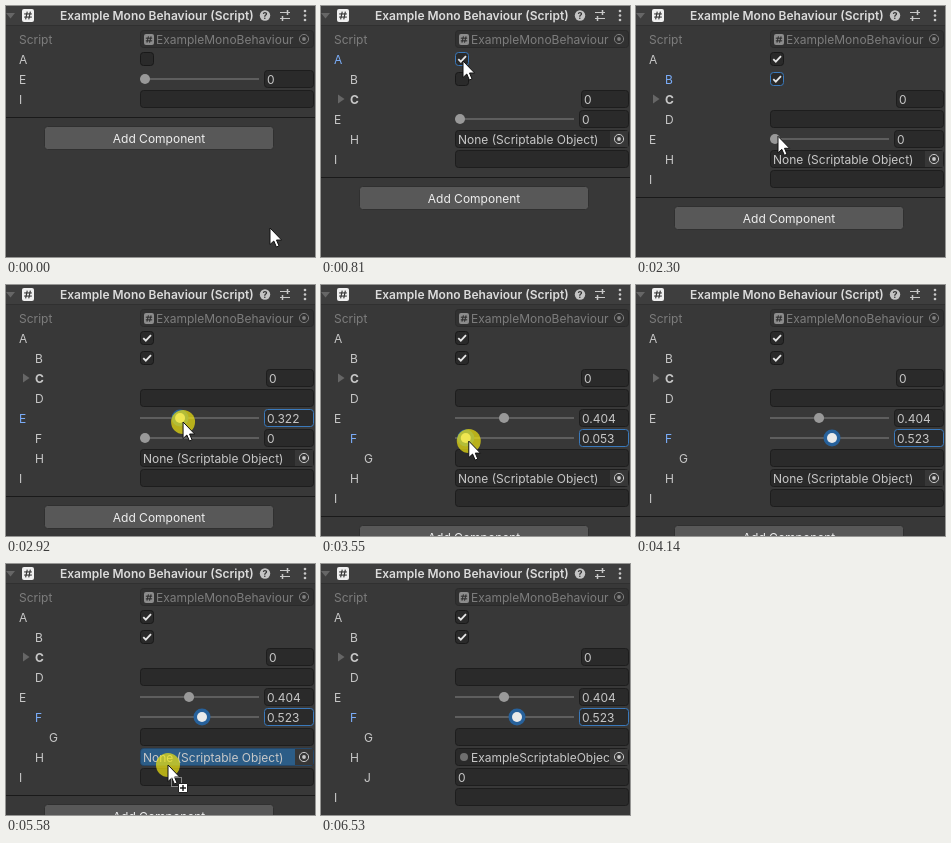
Animation, 309 px wide and 251 px high, one loop 7.14 s. Source, as an HTML page with a canvas:

```html
<!DOCTYPE html>
<html lang="en">
<head>
<meta charset="utf-8">
<title>Inspector with conditional fields</title>
<style>
  html, body { margin: 0; width: 100%; height: 100%; overflow: hidden; background: #383838; }
  canvas { display: block; width: 309px; height: 251px; }
</style>
</head>
<body>
<canvas id="stage"></canvas>
<script>
const W = 309, H = 251, LOOP = 7140;
const FONT = 'Inter, "Liberation Sans", sans-serif';
const TEXT = '#c8c8c8', DIM = '#7d7d7d', BLUE = '#7baefa', FOCUS = '#3a79bb';
const canvas = document.getElementById('stage');
const g = canvas.getContext('2d');
const scale = window.devicePixelRatio || 1;
canvas.width = W * scale;
canvas.height = H * scale;

// Slider geometry: the pointer holds the knob 3px right of its centre.
const knobX = value => 139 + 109 * value;
const gripX = value => knobX(value) + 3;
const gripValue = x => Math.max(0, Math.min(1, (x - gripX(0)) / 109));

const linear = k => k;
const smooth = k => k * k * (3 - 2 * k);
const easeOut = k => 1 - (1 - k) ** 2;

// Pointer path: time, x, y, easing towards this point.
const path = [
  [0, 264, 222], [30, 264, 222], [740, 142, 55, smooth],
  [810, 142, 55], [1520, 142, 82, smooth], [1830, 142, 82],
  [2420, gripX(0), 136, smooth], [2650, gripX(0), 136],
  [2920, gripX(.321), 137], [3150, gripX(.404), 137, easeOut],
  [3200, gripX(.404), 137], [3430, gripX(0), 156, smooth], [3480, gripX(0), 156],
  [3840, gripX(.523), 157, smooth], [3920, gripX(.523), 157],
  [4070, 162, 162, smooth], [4100, 36, 193], [4140, -40, 210],
  [5069, -40, 270], [5070, 152, 256], [5580, 162, 201, easeOut],
  [6140, 162, 201], [6530, 188, 256, smooth], [LOOP, 188, 290]
];
const presses = [[740, 810], [1730, 1830], [2650, 3170], [3480, 3870], [5070, 5810]];
const focusSpans = [
  ['A', 740, 1730], ['B', 1730, 2650], ['E', 2650, 3480],
  ['F', 3480, 4810], ['F', 5070, LOOP]
];
const within = (t, a, b) => t >= a && t < b;

function pointerAt(t) {
  const i = Math.max(1, path.findIndex(p => p[0] > t));
  const [t0, x0, y0] = path[i - 1], [t1, x1, y1, ease = linear] = path[i];
  const k = ease((t - t0) / (t1 - t0));
  return { x: x0 + (x1 - x0) * k, y: y0 + (y1 - y0) * k };
}

const dragValue = (t, from, to) =>
  t < from ? 0 : gripValue(pointerAt(Math.min(t, to)).x);

function stateAt(t) {
  const focus = focusSpans.find(([, a, b]) => within(t, a, b));
  return {
    pointer: pointerAt(t),
    pressed: presses.some(([a, b]) => within(t, a, b)),
    focus: focus && focus[0],
    a: t >= 810,
    b: t >= 1830,
    e: dragValue(t, 2650, 3150),
    f: dragValue(t, 3480, 3840),
    dragging: within(t, 5070, 5810),
    over: within(t, 5400, 5810),
    dropped: t >= 5810
  };
}

function text(str, x, cy, color = TEXT, weight = 400, align = 'left') {
  g.font = `${weight} 12px ${FONT}`;
  g.textAlign = align;
  g.fillStyle = color;
  g.fillText(str, x, cy + 4.5);
}

function clipped(x, y, w, h, draw) {
  g.save();
  g.beginPath();
  g.rect(x, y, w, h);
  g.clip();
  draw();
  g.restore();
}

function disc(x, y, r, color) {
  g.fillStyle = color;
  g.beginPath();
  g.arc(x, y, r, 0, 7);
  g.fill();
}

function box(x, y, w, h, fill, border, r = 3) {
  g.beginPath();
  g.roundRect(x + .5, y + .5, w - 1, h - 1, r);
  g.fillStyle = fill;
  g.fill();
  g.strokeStyle = border;
  g.lineWidth = 1;
  g.stroke();
}

function poly(points, fill) {
  g.beginPath();
  points.forEach(([x, y]) => g.lineTo(x, y));
  g.closePath();
  g.fillStyle = fill;
  g.fill();
}

function line(x0, y0, x1, y1, color, width = 1) {
  g.strokeStyle = color;
  g.lineWidth = width;
  g.beginPath();
  g.moveTo(x0, y0);
  g.lineTo(x1, y1);
  g.stroke();
}

const hovers = (s, x, y, w, h) => !s.dragging &&
  s.pointer.x >= x && s.pointer.x < x + w && s.pointer.y >= y && s.pointer.y < y + h;

function field(s, x, cy, str = '', focused = false) {
  const w = 308 - x, y = cy - 9;
  box(x, y, w, 18, '#2a2a2a', focused ? FOCUS : hovers(s, x, y, w, 18) ? '#656565' : '#1d1d1d');
  text(str, x + 3, cy);
}

function checkbox(s, cy, on, focused) {
  const y = cy - 7;
  box(134, y, 14, 14, '#2a2a2a', focused ? FOCUS : hovers(s, 134, y, 14, 14) ? '#656565' : '#191919');
  if (!on) return;
  g.strokeStyle = '#e6e6e6';
  g.lineWidth = 1.8;
  g.beginPath();
  g.moveTo(137.3, cy + .2);
  g.lineTo(139.8, cy + 2.7);
  g.lineTo(145, cy - 2.8);
  g.stroke();
}

function slider(s, cy, value, focused) {
  const x = knobX(value);
  g.fillStyle = '#5e5e5e';
  g.fillRect(134, cy - 1, 119, 2);
  if (focused) disc(x, cy, 8.5, '#27619b');
  disc(x, cy, 5, focused ? '#eaeaea' : '#999');
  field(s, 258, cy, String(+value.toFixed(3)), focused);
}

function picker(cy, color) {
  g.strokeStyle = color;
  g.lineWidth = 1;
  g.beginPath();
  g.arc(298, cy, 4.6, 0, 7);
  g.stroke();
  disc(298, cy, 1.9, color);
}

function objectField(s, cy) {
  field(s, 134, cy);
  if (s.over) box(134, cy - 9, 174, 18, '#2c5d87', '#25486a');
  clipped(135, cy - 8, 154, 16, () => {
    if (s.dropped) disc(143, cy, 4, '#707070');
    text(s.dropped ? 'ExampleScriptableObject' : 'None (Scriptable Object)', s.dropped ? 150 : 137, cy);
  });
  g.fillStyle = '#373737';
  g.fillRect(289, cy - 8, 18, 16);
  picker(cy, TEXT);
}

function scriptIcon(x, y, size, fill, ink) {
  g.beginPath();
  g.roundRect(x, y, size, size + 1, 2);
  g.fillStyle = fill;
  g.fill();
  const m = size / 2, r = size * .32, d = size * .13;
  for (const k of [-d, d]) {
    line(x + m + k + .8, y + m - r + .5, x + m + k - .8, y + m + r + .5, ink, 1.1);
    line(x + m - r, y + m + k + .5, x + m + r, y + m + k + .5, ink, 1.1);
  }
}

function header() {
  g.fillStyle = '#3e3e3e';
  g.fillRect(0, 0, W, 19);
  g.fillStyle = '#303030';
  g.fillRect(0, 19, W, 1);
  poly([[0, 7], [9, 7], [4.5, 12.5]], '#666');
  scriptIcon(16, 3, 12, '#efefef', '#333');
  clipped(54, 0, 193, 19, () => text('Example Mono Behaviour (Script)', 54, 9.5, '#dcdcdc', 600));
  disc(259, 9.5, 5.2, '#c4c4c4');
  g.font = `700 9px ${FONT}`;
  g.textAlign = 'center';
  g.fillStyle = '#333';
  g.fillText('?', 259, 13);
  line(274, 6.5, 284, 6.5, TEXT);
  line(274, 12.5, 284, 12.5, TEXT);
  line(281.5, 4, 281.5, 9, TEXT, 1.5);
  line(276.5, 10, 276.5, 15, TEXT, 1.5);
  for (const y of [5, 9.5, 14]) disc(299, y, 1.3, TEXT);
}

function scriptRow() {
  text('Script', 13, 33, DIM);
  box(134, 24, 174, 18, '#313131', '#2a2a2a');
  scriptIcon(138, 28, 10, '#8c8c8c', '#303030');
  text('ExampleMonoBehaviour', 150, 33, DIM);
  picker(33, DIM);
}

// Rows: name, indent, visible, control.
const rowsFor = s => [
  ['A', 13, true, cy => checkbox(s, cy, s.a, s.focus === 'A')],
  ['B', 29, s.a, cy => checkbox(s, cy, s.b, s.focus === 'B')],
  ['C', 29, s.a, cy => {
    poly([[17, cy - 4.5], [23.5, cy], [17, cy + 4.5]], '#666');
    field(s, 260, cy, '0');
  }],
  ['D', 29, s.b, cy => field(s, 134, cy)],
  ['E', 13, true, cy => slider(s, cy, s.e, s.focus === 'E')],
  ['F', 29, s.e > 0, cy => slider(s, cy, s.f, s.focus === 'F')],
  ['G', 43, s.f > 0, cy => field(s, 134, cy)],
  ['H', 29, s.a, cy => objectField(s, cy)],
  ['J', 43, s.dropped, cy => field(s, 134, cy, '0')],
  ['I', 13, true, cy => field(s, 134, cy)]
].filter(row => row[2]);

function arrow({ x, y }) {
  const outline = [[0, 0], [0, 16.5], [3.8, 13], [6.4, 19], [9, 17.9], [6.5, 12], [11.6, 12]];
  poly(outline.map(([dx, dy]) => [x + dx, y + dy]), '#fff');
  g.strokeStyle = '#111';
  g.lineWidth = 1;
  g.stroke();
}

function dragBadge({ x, y }) {
  g.strokeStyle = '#ddd';
  g.lineWidth = 1;
  g.setLineDash([1, 1]);
  g.strokeRect(x + 3.5, y + 12.5, 10, 9);
  g.setLineDash([]);
  box(x + 10, y + 18, 10, 10, '#fff', '#222', 0);
  line(x + 12, y + 23, x + 18, y + 23, '#111', 1.4);
  line(x + 15, y + 20, x + 15, y + 26, '#111', 1.4);
}

function draw(t) {
  const s = stateAt(t);
  g.setTransform(scale, 0, 0, scale, 0, 0);
  g.fillStyle = '#383838';
  g.fillRect(0, 0, W, H);
  header();
  scriptRow();

  let cy = 33;
  for (const [name, indent, , control] of rowsFor(s)) {
    cy += 20;
    text(name, indent, cy, s.focus === name ? BLUE : TEXT, name === 'C' ? 700 : 400);
    control(cy);
  }

  g.fillStyle = '#1a1a1a';
  g.fillRect(0, cy + 18, W, 1);
  const top = cy + 27;
  box(38, top, 230, 24, hovers(s, 38, top, 230, 24) ? '#676767' : '#585858', '#303030');
  text('Add Component', 153, top + 12, '#eee', 400, 'center');

  if (s.pressed) disc(s.pointer.x, s.pointer.y, 12, 'rgba(240, 228, 16, .7)');
  arrow(s.pointer);
  if (s.dragging) dragBadge(s.pointer);
}

const start = performance.now();
function tick() {
  draw((performance.now() - start) % LOOP);
  requestAnimationFrame(tick);
}
tick();
</script>
</body>
</html>
```
